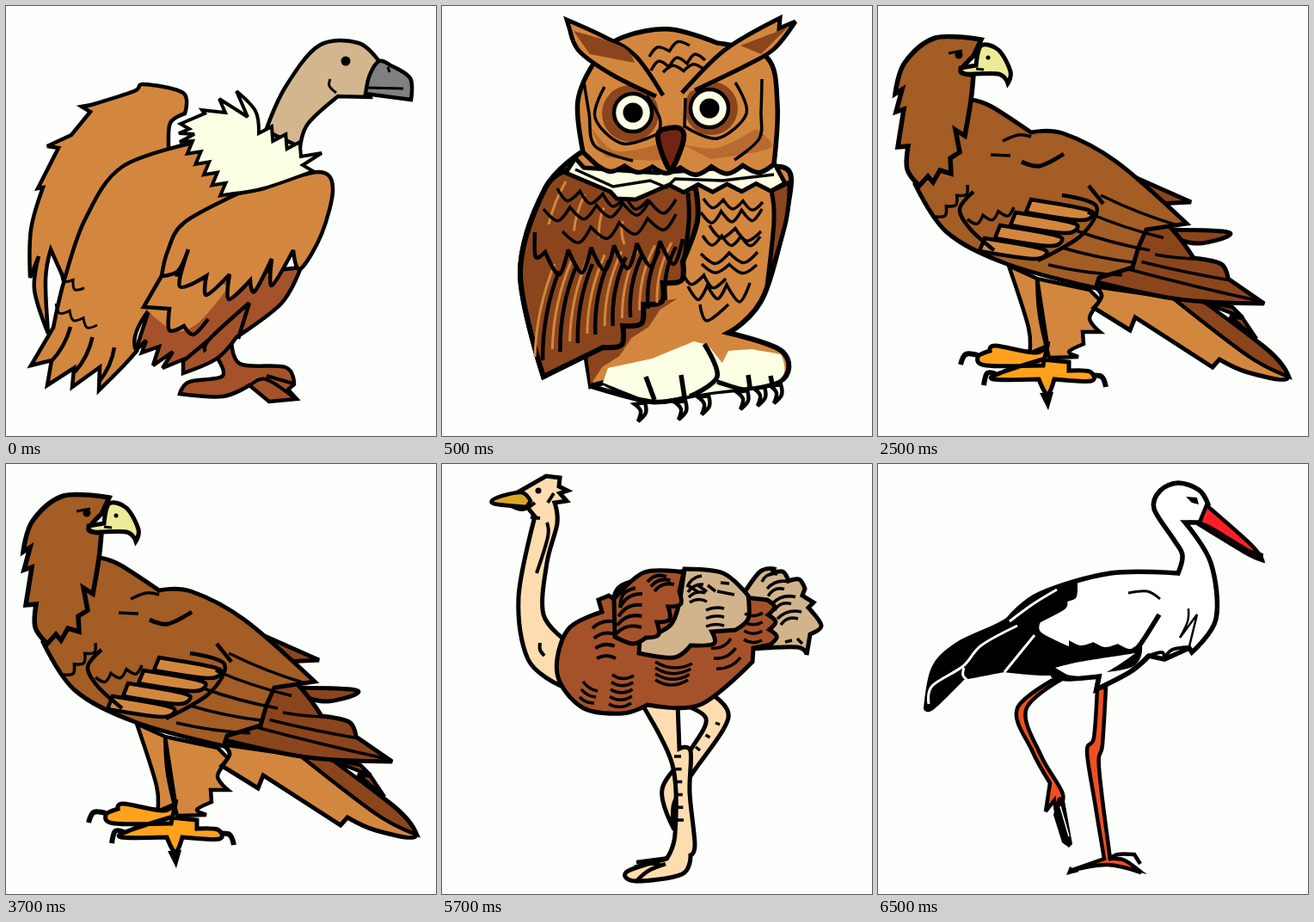
Animation, 500 px wide and 500 px high, one loop 8 s. Source, as an HTML page with a canvas:

```html
<!DOCTYPE html>
<html lang="en">
<head>
<meta charset="utf-8">
<title>Birds</title>
<style>
html, body { margin: 0; width: 100%; height: 100%; overflow: hidden; background: #fdfffc; }
canvas { display: block; width: 100vw; height: 100vh; }
</style>
</head>
<body>
<canvas id="stage" width="500" height="500"></canvas>
<script>
const ctx = document.getElementById('stage').getContext('2d');
const PAPER = '#fdfffc', ORANGE = '#d3873e', RUST = '#a5522a', DARK = '#8b451c', CREAM = '#fdffe4';

// "x,y" is a smooth point, "!" a corner. "~n,d" puts n teeth of depth d
// between two points, "@n,d" puts n round bumps there.
function parse(text) {
  const pts = [];
  let edge = null;
  for (const token of text.trim().split(/\s+/)) {
    const [x, y] = token.replace(/[~@!]/g, '').split(',').map(Number);
    if (/^[~@]/.test(token)) {
      edge = { n: x, depth: y, sharp: token[0] === '~' };
      continue;
    }
    if (edge) {
      const a = pts[pts.length - 1], dx = x - a.x, dy = y - a.y;
      const k = edge.depth / Math.hypot(dx, dy);
      for (let i = 1; i < edge.n * 2; i++) {
        const t = i / (edge.n * 2), out = i % 2 ? k : 0;
        pts.push({ x: a.x + dx * t - dy * out, y: a.y + dy * t + dx * out, corner: edge.sharp || !out });
      }
      edge = null;
    }
    pts.push({ x, y, corner: token.endsWith('!') });
  }
  return pts;
}

function trace(text) {
  const path = new Path2D();
  for (const part of text.split('|')) {
    const closed = part.endsWith('z');
    const pts = parse(part.replace('z', ''));
    const n = pts.length;
    const at = i => pts[(i + n) % n];
    const slope = i => {
      if (at(i).corner || (!closed && (i === 0 || i === n - 1))) return [0, 0];
      return [(at(i + 1).x - at(i - 1).x) / 6, (at(i + 1).y - at(i - 1).y) / 6];
    };
    path.moveTo(pts[0].x, pts[0].y);
    for (let i = 0; i < (closed ? n : n - 1); i++) {
      const a = at(i), b = at(i + 1), s = slope(i), e = slope((i + 1) % n);
      path.bezierCurveTo(a.x + s[0], a.y + s[1], b.x - e[0], b.y - e[1], b.x, b.y);
    }
    if (closed) path.closePath();
  }
  return path;
}

function shape(fill, width, text, color = '#000') {
  const path = trace(text);
  if (fill) { ctx.fillStyle = fill; ctx.fill(path); }
  if (width) { ctx.lineWidth = width; ctx.strokeStyle = color; ctx.stroke(path); }
}
const line = (width, text, color) => shape(null, width, text, color);

function disc(x, y, r, fill, width) {
  ctx.beginPath();
  ctx.arc(x, y, r, 0, 7);
  ctx.fillStyle = fill;
  ctx.fill();
  if (width) { ctx.lineWidth = width; ctx.strokeStyle = '#000'; ctx.stroke(); }
}

// n lines whose ends slide along two guides, "from" and "to".
function fan(n, from, to, bend, width, color = '#000') {
  const [a, b] = parse(from), [c, d] = parse(to);
  ctx.lineWidth = width;
  ctx.strokeStyle = color;
  ctx.beginPath();
  for (let i = 0; i < n; i++) {
    const t = i / (n - 1), mix = (p, q) => p + (q - p) * t;
    const x = mix(a.x, b.x), y = mix(a.y, b.y), u = mix(c.x, d.x), v = mix(c.y, d.y);
    const k = bend * 2 / Math.hypot(u - x, v - y);
    ctx.moveTo(x, y);
    ctx.quadraticCurveTo((x + u) / 2 - (v - y) * k, (y + v) / 2 + (u - x) * k, u, v);
  }
  ctx.stroke();
}

function vulture() {
  shape(ORANGE, 4.5, '189,164 191,136 208,125! 206,101 160,91 149,99 99,115! 88,117! 98,123! 76,150! 48,163! 61,165! 37,212! 43,211! 29,260 28,316! 38,291! 33,330 49,381! 46,318 52,283! 68,319! 115,225 190,170!z');
  shape(RUST, 4.5, '243,405! 252,430 213,437 202,451! 252,454 283,441! 306,460! 338,457! 328,446! 335,440! 325,420 272,416 262,386!z');
  line(4, '283,442 302,434 337,457|303,430 334,439');
  shape(ORANGE, 4.5, '222,158! 135,187 92,248 68,318 55,374! 29,418! 53,412! 48,441! 79,421! 77,443! 109,420! 108,447! 137,418 152,401! 165,355 300,200!z');
  fan(3, '75,373 126,397', '52,414 108,437', -3, 4.5);
  line(3, '65,309! @2,8 91,328!|58,346! @3,8 106,371!');
  shape(RUST, 4.5, '165,357! 151,400! 163,389! 158,403! 178,396! 171,418! 194,402! 182,421! 206,411! 206,427! 245,410 268,385! 320,346 343,304! 200,320!z');
  shape(ORANGE, 0, '182,312! 160,350! 195,377 224,368 260,325!z');
  line(4.5, '182,312! 160,350! 190,352! 190,377 207,372! 218,382 235,364|283,345! 236,388 232,402|283,345! 270,387|236,388! 206,413');
  shape(ORANGE, 4.5, '270,218! 207,252 188,285 181,314! 200,308 212,283! 202,326 233,314! 233,336 260,312! 259,341 284,319! 289,332 309,294! 309,325 334,284! 342,306 367,265 380,211 362,193 300,212!z');
  shape('#d3b68e', 4.5, '302,145! 325,94 364,46 410,43 435,66! 421,87! 424,106! 386,105! 351,137 342,164!z');
  shape(CREAM, 4, '201,148! 213,143! 203,137! 231,125! 228,121! 255,124! 248,108! 281,129! 268,99! 290,122 294,148! ~3,-14 343,175! 367,171! 345,185! 357,192! 300,212 265,218! ~5,-14 217,157! 202,158! 219,149!z');
  shape('#808080', 4.5, '418,102! 423,80 434,64 447,69! 470,84 471,109!z');
  line(3, '420,95 462,96|444,71 446,77|377,85! 376,93 384,101');
  disc(395, 64, 5.5, '#000');
}

function owl() {
  shape(ORANGE, 6, '165,168! 120,212 91,310 118,431! 167,405! 173,442! 188,438! 242,460 306,450 392,437 396,402 333,380! 375,335 406,205 385,188!z');
  shape(DARK, 0, '169,405! 246,345! 274,340! ~3,5 173,440!z');
  shape(DARK, 5, '383,215! 386,250 378,325! 400,250 404,205!z');
  shape(DARK, 6, '150,190! 120,212 91,310 118,431! 187,397! @4,14 280,297! 297,250 295,212!z');
  fan(8, '131,300 267,275', '108,408 250,345', 5, 3, ORANGE);
  fan(8, '136,308 272,280', '117,412 260,342', 5, 4.5);
  fan(4, '144,204 210,250', '124,254 212,277', 2, 3, ORANGE);
  line(4.5, '108,263! 109,292 120,286! @6,28 280,271!');
  line(3.5, '134,212! @4,13 240,225!|118,236! @5,15 272,225!|140,262! @4,16 272,242!');
  line(5, '286,217 287,250 281,298');
  line(3.5, '304,224! @3,10 373,228!|301,240! @3,13 372,236!|311,255! @2,13 371,262!|303,267! @3,11 370,268!|301,288! @2,12 367,286!|302,300! @2,10 366,301!|279,309! @2,13 330,317!|286,326! @2,16 331,324! @1,21 358,322!|300,347! 308,366 333,347');
  shape(CREAM, 0, '187,438! 193,421! 244,410! 293,390! 309,394! 326,415! 333,401! 360,399! 394,405! 391,435 306,450 242,460!z');
  line(5.5, '305,393 320,431 288,454|237,431 247,458|278,429 282,455|320,437 350,446 358,443! 356,429|382,430 384,440|173,442 242,460 281,456');
  for (const [x, y] of [[230, 463], [277, 461], [304, 455], [349, 449], [369, 445], [388, 442]]) {
    ctx.save();
    ctx.translate(x, y);
    shape(CREAM, 4.5, '-6,0! 1,8 -2,20! 7,10 6,-2!z');
    ctx.restore();
  }
  shape(CREAM, 5, '155,177! 165,188! 250,194! 387,184! 399,206! ~4,-9 264,208! 225,225! 203,224! 196,216! 144,194!z');
  line(3.5, '155,190! 199,210! 242,203! 261,211! 271,201! 326,203! 386,196!');
  shape(ORANGE, 5.5, '164,170! 158,110 181,60 211,36 265,27 320,43! 378,60 390,115 386,184! @3,-9 277,188! @3,-7 180,185!z');
  shape('#b96b2f', 0, '166,130! 200,168 252,160! 254,179 190,176!z|278,160! 320,165 365,143! 382,165 312,178!z');
  disc(219, 125, 33, DARK);
  disc(313, 119, 31, DARK);
  line(3.5, '189,94 178,130 210,160 252,148! 253,130 238,104|341,89 354,125 320,154 282,140! 283,107|165,88 171,125 178,163 222,180|372,85 371,123 369,154 340,179|241,59! @2,-8 288,46!|243,75! @3,-9 306,63!|257,77! @2,-7 305,74!');
  shape(ORANGE, 5, '257,104! 225,58 189,36 145,16! 149,29! 160,53 198,80 249,105!|279,101! 329,51 393,14! 392,26! 411,18! 386,50 354,69 294,98!');
  shape(DARK, 0, '153,29! 209,47 224,66! 172,56!z|347,46! 402,25! 371,56!z');
  for (const [x, y] of [[222, 124], [311, 119]]) {
    disc(x, y, 22, CREAM, 4.5);
    disc(x, y, 11.5, '#000');
  }
  shape('#702411', 6, '254,145 276,142 281,155 270,185 263,188 252,159z');
}

function eagle() {
  const brown = '#a35d25';
  shape(ORANGE, 4.5, '152,302! 175,374 176,404! 197,395! 185,317!z|185,317! 188,360 199,409! 233,408! 222,402 239,393! 238,379! 258,379! 246,363 259,343! 246,330!z');
  shape(ORANGE, 5, '252,326! 260,337 251,351! 293,377! 299,362! 389,420! 397,411! 430,426 476,433 450,397 365,342!z');
  shape(DARK, 4.5, '342,339! 432,408 478,431! 455,402 375,341!z|369,341! 424,362! 412,350!z|409,361! 440,387! 424,363!z');
  shape(DARK, 5, '285,193! 364,228! 325,230!z|328,260! 401,262 406,268 375,276 350,272!z');
  shape(DARK, 5, '250,320! 350,341 449,346! 407,317! 399,300 367,293! 345,263 310,230!z');
  shape(brown, 5, '43,207! 80,263 150,300 253,328! 257,316! 296,304! 303,280! 312,260! 359,253! 277,181 215,148 178,147! 132,117 109,109!z');
  fan(3, '322,289 291,306', '372,294 448,344', 1, 3.5);
  for (let i = 0; i < 4; i++) {
    ctx.save();
    ctx.translate(-18 * i, 15 * i);
    shape(ORANGE, 4.5, '178,225! 240,236 250,243 234,249 172,240!z');
    ctx.restore();
  }
  line(4.5, '111,216 95,236 107,259 135,284|214,220 254,233 236,267 186,296|245,209 262,230');
  fan(5, '259,220 198,301', '348,255 284,313', 2, 3.5);
  line(3.5, '104,248! @3,8 158,234!|67,245! @3,7 104,208!|145,157 163,150 178,152|131,173 154,174');
  line(5, '167,181 188,186 216,172');
  shape(brown, 5.5, '120,39! 67,37 31,66 20,102! 28,97! 21,123! 30,120! 23,164! 35,163! 34,190 48,209! 58,198! 64,205! 72,191! 85,195! 84,177! 95,170! 90,144! 101,151! 108,110 111,80! 96,76 111,58!z');
  shape('#eeeb98', 5, '114,69! 120,46 140,51 154,76 151,90! 140,79 102,79 96,72!z');
  line(3, '114,73 123,74|82,55 98,52');
  disc(94, 57, 4.5, '#000');
  disc(128, 60, 2.5, '#000');
  line(6, '116,406 102,405 96,417|137,428 127,427 123,441|247,430 260,431 265,443');
  shape('#ffa11c', 5, '198,390! 184,403 137,395 130,401! 116,408 126,418 192,418!z|191,411! 144,426 134,434 187,434! 197,452 205,434! 248,436 246,425 222,424! 222,414!z');
  shape('#000', 0, '188,450! 198,470! 204,449!z');
}

function ostrich() {
  const skin = '#fdddb0', tan = '#d2b48c';
  shape(skin, 5, '309,265! 333,295 291,360 270,394 270,425! 256,378 290,331 307,296 278,279!z');
  shape(skin, 5, '231,277! 268,350 271,430 261,459! 215,474 225,485 279,477 289,455! 294,442 288,382 289,334 276,331! 274,280!z');
  line(4.5, '226,463 264,458|225,486! 240,473 260,465');
  shape('#000', 0, '222,467! 256,457! 253,467!z');
  fan(6, '270,340 273,414', '278,340 281,414', 0, 3.5);
  fan(3, '318,301 295,329', '323,303 300,333', 0, 3.5);
  shape(skin, 5, '108,61! 89,155 100,227 136,257! 146,207! 118,175 122,115 134,69 131,45! 145,43! 137,34! 146,31! 136,26! 137,16! 121,14! 88,33! 95,45!z');
  line(4, '103,62 114,63|122,68 123,85 110,127|123,45 130,34|114,208 114,216 119,223');
  shape('#dba528', 4.5, '103,43! 92,33 64,39 60,46 98,50!z');
  line(4, '78,48 94,53 108,45');
  disc(112, 31, 3.5, '#000');
  shape(tan, 5, '350,152! 370,125 386,122! 384,127! @2,-7 422,145! 419,153! 432,161! 426,167! 441,188 428,198! 424,222! 413,213 360,215!z');
  fan(4, '372,137 394,187', '390,128 414,180', -4, 3.5);
  fan(3, '378,145 390,180', '404,137 418,172', -4, 3.5);
  line(3.5, '399,207 407,205|413,203 419,209');
  shape(RUST, 5, '284,124! 213,139 200,157! 194,153! 182,158! 186,172! 146,193 134,244 163,283 210,290 239,280! 300,280 361,230! 362,214! 382,210! @3,8 378,158! 351,155!z');
  shape(tan, 5, '282,122! 327,127 356,153! 356,180 341,193! 314,195! 316,209 289,211! 270,225 229,220! 230,204! 266,187 278,150!z');
  shape(RUST, 5, '200,157! 235,126 281,126! 276,148! @3,-10 237,202! 222,209 201,201!z');
  fan(4, '207,167 202,198', '233,151 232,190', -5, 4);
  fan(3, '239,137 247,148', '261,131 270,140', -4, 4);
  fan(4, '175,191 180,226', '198,183 202,226', -3, 4);
  line(4, '207,167 211,151 225,144');
  fan(5, '198,245 194,279', '223,246 220,278', 4, 3.5);
  fan(4, '248,230 248,251', '291,232 286,251', 6, 3.5);
  fan(3, '164,253 160,271', '181,264 177,278', 2, 3.5);
  fan(3, '313,214 319,238', '336,203 347,225', 4, 3.5);
  fan(4, '352,174 351,204', '373,173 372,205', 3, 3.5);
  fan(4, '285,143 288,161', '302,130 308,160', -3, 3.5);
  fan(3, '286,141 309,141', '298,149 318,148', 0, 3.5);
  fan(3, '307,170 307,189', '328,168 328,188', -2, 3.5);
  fan(2, '324,138 320,148', '334,139 340,152', 0, 3.5);
}

function stork() {
  const red = '#f0501f';
  shape(red, 4.5, '214,245! 162,284 179,333 200,371! 195,404! 205,391! 207,404! 215,384 190,340 172,286 214,250!z');
  shape('#000', 0, '209,388! 204,408! 214,440! 222,446! 226,442! 216,386!z');
  line(1.5, '212,398 222,433', '#fff');
  shape(red, 4.5, '255,260! 251,318 243,334 252,393 263,459! 223,473! 267,466 306,475! 287,461 270,459! 257,353 261,326 265,260!z');
  line(4.5, '268,460 279,454 298,454! 305,465');
  shape('#000', 0, '223,468! 219,478! 234,474!z|295,464! 313,477! 295,473!z');
  shape('#fff', 5.5, '384,47! 373,30 349,22 328,31 321,52 344,88 354,106 349,127! 270,127 188,151 152,180! 205,244! 257,247! 254,262! 293,242 315,223! 333,227! 362,214! 365,219! 393,180 387,115 357,68! 375,68!z');
  shape('#000', 0, '232,137! 195,146 146,181 90,208 62,237 53,285! 64,286 100,251! 147,242! 206,246 293,237 307,211! @3,-5 222,205! 222,212! 190,196 189,184! 217,169 220,160! 230,156 232,146!z');
  line(3, '153,183 180,163 208,146|59,279 63,258 99,235 120,211 162,188|147,242 182,199|100,237 99,246 107,254', '#fff');
  shape('#fff', 0, '206,237! 235,230 299,220! 257,246 220,245!z');
  line(5.5, '202,245 220,250 257,247! 254,262! 294,241 315,223|327,175 304,211 295,216');
  line(3, '291,150 313,148 328,157');
  line(2.5, '361,168! 360,183 351,202! 371,175! 361,216');
  line(4, '315,223 330,219 333,226! 342,216 360,213! 365,219');
  shape('#ff1f26', 4.5, '382,48! 434,94 447,112! 427,103 373,70!z');
  line(4, '357,68 379,70 410,88 447,111');
  shape('#000', 0, '358,38! 371,39! 373,47! 365,45!z|432,99! 448,104! 448,115!z');
}

const birds = [vulture, owl, eagle, ostrich, stork];
const ends = [500, 2500, 4500, 6500, 8000];
let shown = -1;

function tick(now) {
  const i = ends.findIndex(end => now % 8000 < end);
  if (i !== shown) {
    shown = i;
    ctx.fillStyle = PAPER;
    ctx.fillRect(0, 0, 500, 500);
    ctx.miterLimit = 3;
    birds[i]();
  }
  requestAnimationFrame(tick);
}
tick(performance.now());
</script>
</body>
</html>
```
